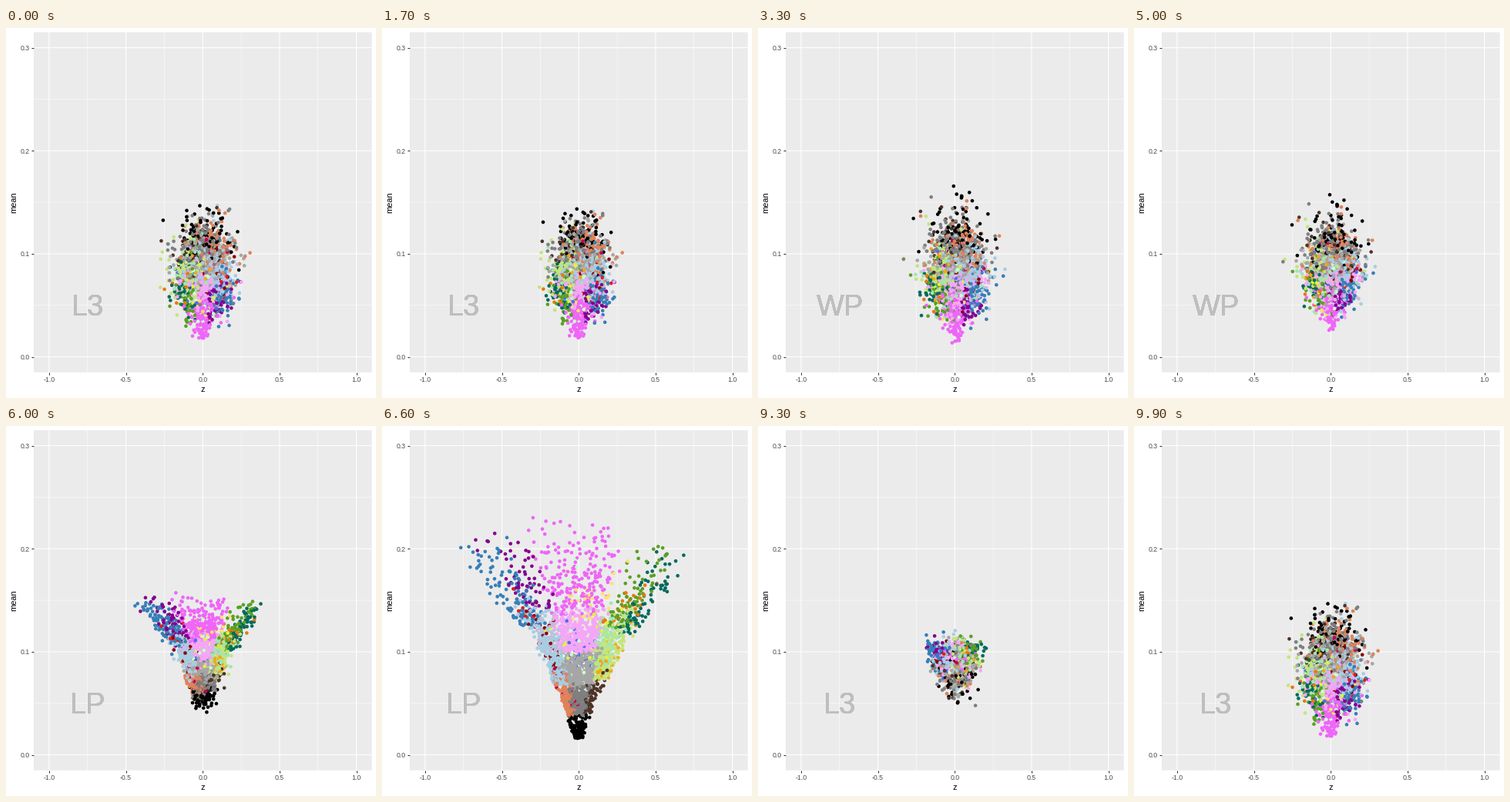
Recreate the animation shown at these times as a matplotlib script. Size 480x480 px, loop 10 s.

```python
import numpy as np
import matplotlib.pyplot as plt
from matplotlib.animation import FuncAnimation

plt.rcParams["font.family"] = "Liberation Sans"
SIZE, DPI = 480, 72
LEFT, RIGHT, TOP, BOTTOM = 36, 474.5, 5.5, 446.7

# colour: count, lowest and highest mean, range of z / mean (pose "LP")
GROUPS = {
    "#000000": (130, .016, .044, -1.9, 1.5),
    "#7f7f7f": (300, .038, .072, -1.0, 1.1),
    "#a6a6a6": (430, .068, .104, -1.2, 1.3),
    "#f4a6f7": (450, .100, .146, -1.1, 1.05),
    "#ee66f7": (230, .136, .232, -1.4, 1.15),
    "#a6cee3": (300, .068, .156, -2.4, -1.1),
    "#c5bbdc": (60, .100, .148, -2.3, -1.0),
    "#e0825a": (170, .038, .084, -2.0, -0.8),
    "#8b0008": (34, .080, .145, -2.4, -1.2),
    "#c20054": (18, .045, .090, -2.0, 0.9),
    "#e31a1c": (11, .132, .165, -3.0, -1.9),
    "#377eb8": (115, .124, .222, -3.5, -1.9),
    "#83008f": (62, .140, .222, -2.8, -1.3),
    "#4f6bee": (34, .080, .135, -0.6, 0.9),
    "#4d3328": (70, .040, .086, 0.8, 2.1),
    "#a3e4b4": (120, .085, .152, 1.0, 2.4),
    "#c3e67a": (210, .073, .148, 1.2, 2.6),
    "#eea91a": (32, .073, .115, 1.5, 2.6),
    "#ea780c": (28, .125, .175, 1.5, 2.9),
    "#5aa024": (75, .122, .212, 1.6, 2.8),
    "#006a5c": (80, .116, .208, 2.3, 3.4),
    "#ffe070": (30, .130, .200, -0.3, 1.5),
    "#e3f240": (30, .090, .160, -1.6, 1.8),
    "#ccffd0": (32, .055, .195, -0.8, 1.1),
}
LABELS = ("L3", "WP", "LP")
MOVES = ((16, 33), (49, 66), (83, 99))


def make_poses(rng):
    """Return the three poses (n, 2) and the point colours."""
    late, colors = [], []
    for color, (n, lo, hi, a0, a1) in GROUPS.items():
        f = rng.beta(1.1, 1.9, n)
        mean = lo + (hi - lo) * f
        slope = rng.uniform(a0, a1, n) * (.9 + .3 * f)
        late.append(np.column_stack([mean * (slope + rng.normal(0, .15, n)), mean]))
        colors += [color] * n
    late = np.vstack(late)
    order = rng.permutation(len(late))
    late, colors = late[order], [colors[i] for i in order]

    # the two early poses mirror each other about a common middle
    z, mean = late.T
    n = len(z)
    mid = ((.253 - mean) / 2 + .035 * abs(z)) * (1 + rng.normal(0, .035, n))
    middle = np.column_stack([mid * (rng.normal(.1, .35, n) - 4 * z), mid])
    tail = np.clip(rng.standard_t(4, (n, 2)), -5, 5)
    shift = tail * mid[:, None] * (.5, .1)
    return (middle + shift, middle - shift, late), colors


def style_axes(fig):
    ax = fig.add_axes([LEFT / SIZE, 1 - BOTTOM / SIZE,
                       (RIGHT - LEFT) / SIZE, (BOTTOM - TOP) / SIZE],
                      facecolor="#ebebeb")
    ax.patch.set_snap(False)
    ax.set(xlim=(-1.1, 1.1), ylim=(-.015, .315))
    ax.set_xticks(np.arange(-1, 1.1, .5), ["-1.0", "-0.5", "0.0", "0.5", "1.0"])
    ax.set_yticks([0, .1, .2, .3], ["0.0", "0.1", "0.2", "0.3"])
    ax.set_xticks(np.arange(-.75, 1, .5), minor=True)
    ax.set_yticks([.05, .15, .25], minor=True)
    ax.grid(which="major", color="white", lw=1.07, snap=False)
    ax.grid(which="minor", color="white", lw=.53, snap=False)
    ax.set_axisbelow(True)
    ax.spines[:].set_visible(False)
    ax.tick_params(which="major", length=2.75, width=1.07, pad=2.2,
                   color="#333333", labelcolor="#4d4d4d", labelsize=8.8)
    ax.tick_params(which="minor", length=0)
    fig.text(255.25 / SIZE, 1 - 472 / SIZE, "z", size=11, ha="center")
    fig.text(13 / SIZE, 1 - 226 / SIZE, "mean", size=11, ha="center",
             va="baseline", rotation=90, rotation_mode="anchor")
    return ax


poses, colors = make_poses(np.random.default_rng(12))
fig = plt.figure(figsize=(SIZE / DPI, SIZE / DPI), dpi=DPI, facecolor="white")
ax = style_axes(fig)
dots = ax.scatter(*poses[0].T, s=4.6 ** 2, c=colors, linewidths=0, zorder=3)
# stacked copies give the label its hard edges
label_y = (BOTTOM - 373.3) / (BOTTOM - TOP) * .33 - .015
labels = [ax.text(-.748, label_y, "", size=38, color="#bebebe", ha="center",
                  va="baseline", zorder=2) for _ in range(10)]


def draw(k):
    points, state = poses[0].copy(), 0
    for i, (start, end) in enumerate(MOVES):
        t = np.clip((k - start) / (end - start), 0, 1)
        points += t * (poses[(i + 1) % 3] - poses[i])
        state += t >= .5
    dots.set_offsets(points)
    for text in labels:
        text.set_text(LABELS[state % 3])
    return [dots, *labels]


anim = FuncAnimation(fig, draw, frames=100, interval=100, repeat=True,
                     repeat_delay=0)
plt.show()
```
